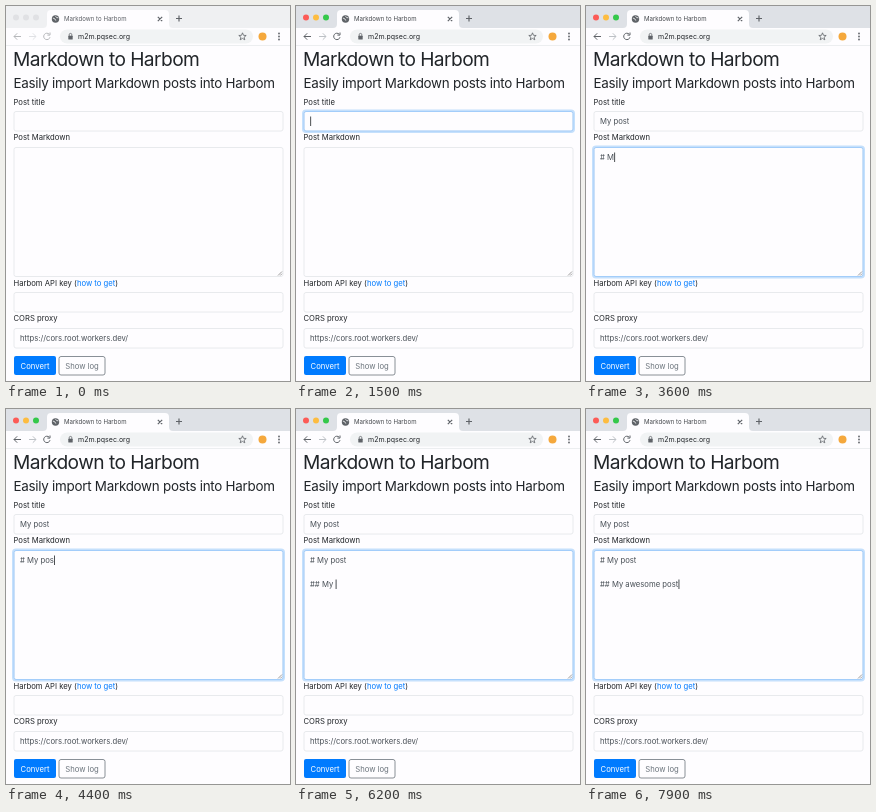
An HTML page for the animation above (8000 ms loop, 284 by 375 pixels).

```html
<!DOCTYPE html>
<html lang="en">
<head>
<meta charset="utf-8">
<title>Markdown to Harbom</title>
<style>
  html, body { margin: 0; width: 100%; height: 100%; overflow: hidden; background: #fefdff; }
  svg { display: block; width: 284px; height: 375px; }
  text { font: 7.7px Inter, Roboto, sans-serif; fill: #212529; white-space: pre; }
  .value { fill: #495057; }
  .field { fill: #fefdff; stroke: #e8eaed; }
  .glow { fill: none; stroke: #c5e0fc; stroke-width: 2; }
  .edge { fill: none; stroke: #a3cdfa; }
  .icon { fill: none; stroke: #5f6368; stroke-width: 1; }
</style>
</head>
<body>
<svg viewBox="0 0 284 375">
  <rect id="strip" width="284" height="22"/>
  <g id="lights"><circle cx="10" cy="11.5" r="3"/><circle cx="20" cy="11.5" r="3"/><circle cx="30" cy="11.5" r="3"/></g>
  <path d="M37 22q4 0 4-4V8q0-4 4-4h114q4 0 4 4v10q0 4 4 4z" fill="#fefdff"/>
  <circle cx="49.5" cy="13" r="3.7" fill="#5f6368"/>
  <path d="M46.8 12l2 .8 1 1.8M49.5 10.2l1.2 1.4 1.7.2" fill="none" stroke="#fff" stroke-width=".8"/>
  <text id="tab" x="58" y="15.2" style="font-size:6.1px">Markdown to Harbom</text>
  <path class="icon" d="M151.8 10.8l4.4 4.4m0-4.4l-4.4 4.4M170 12.5h6M173 9.5v6" style="stroke-width:1.2"/>

  <rect y="22" width="284" height="17" fill="#fefdff"/>
  <rect x="54" y="23.5" width="193" height="14" rx="7" fill="#f1f3f4"/>
  <g id="nav">
    <path class="icon" d="M15 30.5H8m3.2-3.2L8 30.5l3.2 3.2"/>
    <path class="icon" d="M23 30.5h7m-3.2-3.2l3.2 3.2-3.2 3.2" style="stroke:#bdc1c6"/>
    <path class="icon" d="M43.2 28.2a3.2 3.2 0 1 0 .8 3M44 26.5v2.6h-2.6"/>
  </g>
  <rect x="62.3" y="29.8" width="4.4" height="3.8" rx=".5" fill="#5f6368"/>
  <path class="icon" d="M63.2 30v-1.3a1.3 1.3 0 0 1 2.6 0V30" style="stroke-width:.8"/>
  <text x="72" y="33" style="font-size:7px">m2m.pqsec.org</text>
  <path class="icon" d="M236.5 26.8l1 2.5 2.7.2-2.1 1.7.7 2.6-2.3-1.4-2.3 1.4.7-2.6-2.1-1.7 2.7-.2z" style="stroke-width:.8"/>
  <circle cx="256.5" cy="30.5" r="4" fill="#f5a83c"/>
  <g fill="#5f6368"><circle cx="273" cy="27.5" r=".9"/><circle cx="273" cy="30.5" r=".9"/><circle cx="273" cy="33.5" r=".9"/></g>
  <path d="M0 39.5h284" stroke="#eceef0"/>

  <text x="7" y="59.5" style="font-size:19.2px;letter-spacing:-.03em">Markdown to Harbom</text>
  <text x="7.5" y="82" style="font-size:13.4px;letter-spacing:-.02em">Easily import Markdown posts into Harbom</text>
  <text x="7.5" y="98.7">Post title</text>
  <text x="7.5" y="134.2">Post Markdown</text>
  <text x="7.5" y="279.7">Harbom API key (<tspan fill="#007bff">how to get</tspan>)</text>
  <text x="7.5" y="315.2">CORS proxy</text>
  <g id="fields"></g>
  <path d="M272 269.5l4-4m-1.8 4l1.8-1.8" stroke="#777" stroke-width=".7"/>
  <text class="value" x="14" y="334.7">https://cors.root.workers.dev/</text>

  <rect x="8" y="350" width="42" height="19" rx="2" fill="#007bff"/>
  <text x="29" y="362.5" text-anchor="middle" style="fill:#fff">Convert</text>
  <rect x="53" y="350.5" width="46" height="18.5" rx="2" fill="#fefdff" stroke="#6c757d" stroke-width=".8"/>
  <text x="76" y="362.5" text-anchor="middle" style="fill:#6c757d">Show log</text>

  <g id="typed"></g>
  <rect id="caret" width=".8" height="9.5" fill="#212529"/>
</svg>
<script>
const $ = id => document.getElementById(id);
const LOOP = 8000, ACTIVATE = 400, FADE = 150, LINE = 12;

function add(parent, tag, attrs) {
  const el = document.createElementNS('http://www.w3.org/2000/svg', tag);
  for (const k in attrs) el.setAttribute(k, attrs[k]);
  return parent.appendChild(el);
}

const box = (parent, y, height, cls, grow = 0) => add(parent, 'rect', {
  x: 8 - grow, y: y - grow, width: 269 + 2 * grow, height: height + 2 * grow, rx: 2 + grow, class: cls
});

for (const [y, h] of [[105.5, 19.5], [141.5, 129], [286.5, 19.5], [322.5, 19.5]]) box($('fields'), y, h, 'field');

// Each key of the text appears at the matching time.
const inputs = [
  { y: 105.5, h: 19.5, base: 118, from: 1200, to: 2800, text: 'My post',
    keys: [1700, 1900, 1900, 2200, 2300, 2400, 2500] },
  { y: 141.5, h: 129, base: 154, from: 2800, to: Infinity, text: '# My post\n\n## My awesome post',
    keys: [3400, 3600, 3600, 3800, 4000, 4200, 4300, 4400, 4500, 4900, 5000,
           5200, 5400, 5500, 5800, 6000, 6200, 6400, 6500, 6600, 6700, 6800,
           6900, 7000, 7100, 7300, 7400, 7600, 7700] }
];

for (const f of inputs) {
  f.ring = add($('fields'), 'g', {});
  box(f.ring, f.y, f.h, 'glow', 1);
  box(f.ring, f.y, f.h, 'edge');
  f.lines = f.text.split('\n').map((_, i) => add($('typed'), 'text', { class: 'value', x: 14, y: f.base + i * LINE }));
}

const ramp = x => Math.max(0, Math.min(1, x / FADE));

function drawInput(f, t) {
  f.ring.setAttribute('opacity', ramp(t - f.from) - ramp(t - f.to));
  const count = f.keys.filter(k => k <= t).length;
  const rows = f.text.slice(0, count).split('\n');
  f.lines.forEach((line, i) => line.textContent = rows[i] || '');
  if (t < f.from || t >= f.to) return;
  const last = rows.length - 1;
  const width = rows[last] ? f.lines[last].getComputedTextLength() : 0;
  const since = t - (count ? f.keys[count - 1] : f.from);
  $('caret').setAttribute('x', 14.3 + width);
  $('caret').setAttribute('y', f.base + last * LINE - 7.5);
  $('caret').setAttribute('opacity', since % 1000 < 500 ? 1 : 0);
}

function draw() {
  const t = performance.now() % LOOP;
  const active = t >= ACTIVATE;
  $('strip').setAttribute('fill', active ? '#dee1e6' : '#eff0f2');
  $('tab').style.fill = active ? '#45494d' : '#5b5f64';
  $('nav').setAttribute('opacity', active ? 1 : .45);
  [...$('lights').children].forEach((c, i) =>
    c.setAttribute('fill', active ? ['#fc5b57', '#fdbc40', '#34c84a'][i] : '#e0e1e4'));
  $('caret').setAttribute('opacity', 0);
  inputs.forEach(f => drawInput(f, t));
  requestAnimationFrame(draw);
}
draw();
</script>
</body>
</html>
```
